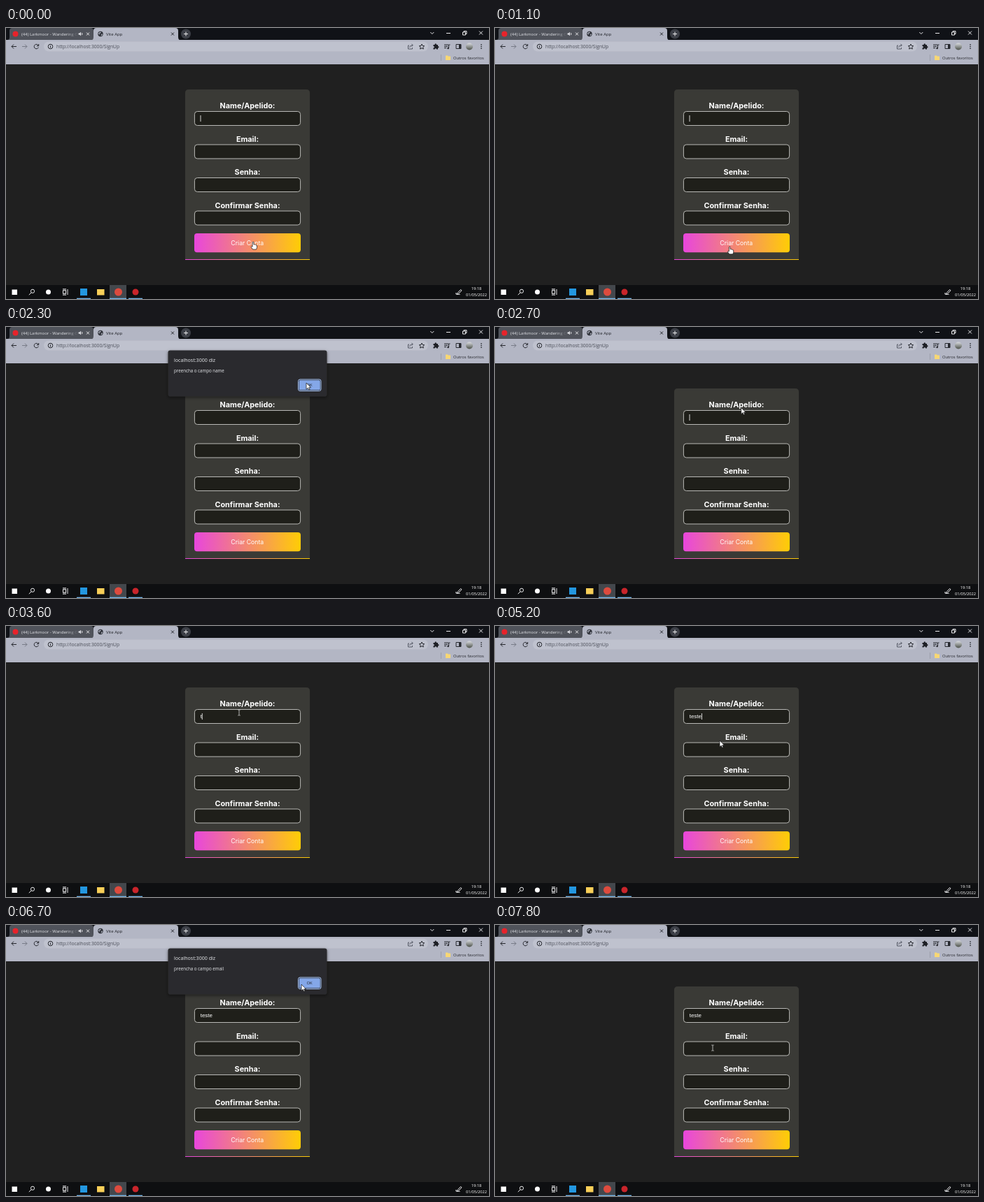
An HTML page for the animation above (8000 ms loop, 690x388 px).

```html
<!DOCTYPE html>
<html lang="pt">
<head>
<meta charset="utf-8">
<title>Vite App</title>
<style>
html, body { margin: 0; width: 100%; height: 100%; overflow: hidden; background: #202020; }
svg { display: block; width: 100vw; height: 100vh; font-family: "Open Sans", "Noto Sans", sans-serif; }
.line { fill: none; stroke: #26282e; stroke-width: 1; }
.light { stroke: #e8e8ea; }
.label { font: 700 10.8px Inter, sans-serif; fill: #fff; text-anchor: middle; }
.field { fill: #1f1f1a; stroke: #c9c9c6; stroke-width: .9; }
.value { font: 8px "Liberation Sans", Arial, sans-serif; fill: #fff; }
.cursor { fill: #fff; stroke: #111; stroke-width: .7; stroke-linejoin: round; }
</style>
</head>
<body>
<svg viewBox="0 0 690 388" preserveAspectRatio="none">
  <defs>
    <linearGradient id="warm"><stop stop-color="#e846dc"/><stop offset="1" stop-color="#ffcd05"/></linearGradient>
    <linearGradient id="fade"><stop offset=".8" stop-color="#e2e3e8"/><stop offset="1" stop-color="#e2e3e8" stop-opacity="0"/></linearGradient>
    <linearGradient id="photo" x2="0" y2="1"><stop stop-color="#d9dce0"/><stop offset="1" stop-color="#4c5149"/></linearGradient>
    <filter id="shadow" x="-10%" y="-20%" width="120%" height="150%"><feDropShadow dx="0" dy="1.5" stdDeviation="2" flood-opacity=".5"/></filter>
  </defs>

  <!-- tab strip -->
  <rect width="690" height="18" fill="#101217"/>
  <path d="M2 17Q5 17 5 13V4Q5 0 9 0H121Q125 0 125 4V17Z" fill="#50535b"/>
  <path d="M121 17.5Q125 17.5 125 13V4Q125 0 129 0H242Q246 0 246 4V13Q246 17.5 250 17.5Z" fill="#b3b6c4"/>
  <circle cx="13.5" cy="8.5" r="4" fill="#e8232b"/>
  <text x="22" y="10.8" font-size="6" fill="url(#fade)">(44) Larkmoor - Wandering O</text>
  <path d="M103.5 7.5h1.5l2-1.7v5.4l-2-1.7h-1.5z" fill="#e2e3e8"/>
  <path class="line light" stroke-width=".8" d="M108.3 7q1.4 1.5 0 3M115 6.5l4 4m0-4l-4 4"/>
  <circle cx="135" cy="8.5" r="3.7" fill="#2c2f36"/>
  <path d="M132.3 7.2q2-2.2 3.2-1.2t-1 1.6-.3 2.2-1.9-1zm4 1.6q2-.8 1.3 1t-1.9 1.2z" fill="#b3b6c4"/>
  <text x="143" y="10.8" font-size="6" fill="#22242a">Vite App</text>
  <path class="line" d="M236 6.5l4 4m0-4l-4 4"/>
  <circle cx="257" cy="8.5" r="7" fill="#3c3f47"/>
  <path class="line light" d="M257 5.5v6m-3-3h6M606.3 6l2.5 2.5L611.300 6M629 7.500h6M652.500 6h4v4h-4zM654 6V4.500h4V8.500h-1.500M676 4.500l5 5m0-5l-5 5"/>

  <!-- toolbar -->
  <rect y="17" width="690" height="35" fill="#b3b6c4"/>
  <rect x="54" y="19.500" width="549" height="14" rx="7" fill="#bfc2ce"/>
  <path class="line" d="M15 26.500H8m3-3l-3 3 3 3M46.200 25a3.200 3.200 0 1 0 .2 2.700M46.700 23v2.700h-2.700"/>
  <path class="line" style="stroke:#777b87" d="M23 26.500h7m-3-3l3 3-3 3"/>
  <g class="line" stroke-width=".8">
    <circle cx="63.500" cy="26.500" r="3.300"/>
    <path d="M63.500 26v2.300M63.500 24.500v.8"/>
    <path style="stroke:#555965" d="M576 25h-1.500v5h6v-2M576.500 28q.3-3.300 4.500-3.300m-1.500-1.900l1.800 1.900-1.800 1.800"/>
    <path d="M594 23l1.100 2.400 2.600.3-1.900 1.800.5 2.600-2.300-1.300-2.300 1.300.5-2.600-1.900-1.800 2.600-.3z"/>
  </g>
  <text x="72" y="28.900" font-size="6.750" fill="#4a4d57">http://localhost:3000/SignUp</text>
  <path d="M610.500 24h2q0-1.700 1.300-1.700T615 24h2v2q1.500 0 1.500 1.300T617 28.500V30.500h-2q0-1.300-1.200-1.300t-1.300 1.300h-2v-2q1.400 0 1.400-1.200t-1.400-1.300z" fill="#1d1f25"/>
  <path class="line" d="M626 24h6m-6 2.300h5m-5 2.300h3M632.500 29v-5h2M643 23.500h7v6h-7z"/>
  <path d="M647 23.500h3v6h-3z" fill="#26282e"/>
  <circle cx="631.600" cy="29" r="1.300" fill="#26282e"/>
  <circle cx="662" cy="26.500" r="5" fill="url(#photo)"/>
  <path d="M678.300 23h1.400v1.400h-1.400zm0 2.800h1.400v1.400h-1.400zm0 2.800h1.400v1.400h-1.400z" fill="#26282e"/>
  <path d="M621.500 38v9" stroke="#92959f" stroke-width=".7"/>
  <path d="M628 39.500h3l1 1h3v5.500h-7z" fill="#f7d774"/>
  <text x="639" y="44.600" font-size="5.800" fill="#26282e">Outros favoritos</text>

  <!-- sign-up card -->
  <path d="M256 332V93Q256 88 261 88H429Q434 88 434 93V332Z" fill="#3a3a36"/>
  <rect x="256" y="331" width="178" height="1" fill="url(#warm)"/>
  <g id="form"></g>
  <rect x="269" y="294" width="152" height="27.300" rx="4" fill="url(#warm)"/>
  <text x="344.800" y="311" text-anchor="middle" style="font:8.700px Inter,sans-serif" fill="#fff">Criar Conta</text>
  <text id="name" class="value" x="277.700" y="132.300"></text>
  <rect id="caret" width=".8" height="9" fill="#fff"/>

  <!-- taskbar -->
  <rect y="368" width="690" height="20" fill="#0e0f11"/>
  <rect x="148" y="368" width="24" height="20" fill="#43474c"/>
  <path d="M101 387.300h20M148 387.300h24M175 387.300h20" stroke="#76b9ed" stroke-width="1.300"/>
  <rect x="8.500" y="374.500" width="7.500" height="7.500" fill="#fff"/>
  <path class="line light" d="M36 379l-3.200 3.200M81.500 375.500h4v5h-4zM88 374v8M81 373.800h5M81 382.200h5"/>
  <circle class="line light" cx="38" cy="376.800" r="2.600"/>
  <circle cx="60.500" cy="378" r="3.500" fill="#fff"/>
  <rect x="106" y="373" width="10" height="10" fill="#2397e0"/>
  <rect x="130" y="374" width="10.500" height="8.500" fill="#f8cf58"/>
  <circle cx="160.500" cy="378" r="5.500" fill="#dd4b3e"/>
  <circle cx="185" cy="378" r="4.500" fill="#c9252b"/>
  <path class="line light" d="M645 379.500l4.500-5 1.500 1.300-4.500 4.700-2 .5zM643 379q-1 3 1.500 2.500t4 0"/>
  <g fill="#fff" text-anchor="middle" font-size="5.700">
    <text x="672" y="375.300">19:18</text>
    <text x="672" y="384.300">01/05/2022</text>
  </g>

  <!-- alert -->
  <g id="alert">
    <rect x="231.500" y="33.500" width="227" height="66" rx="3" fill="#292a2d" filter="url(#shadow)"/>
    <text x="240" y="50.300" font-size="7.100" fill="#e8eaed">localhost:3000 diz</text>
    <text id="message" x="240" y="64.500" font-size="6.200" fill="#e8eaed"></text>
    <rect x="417.500" y="75" width="32.500" height="16.500" rx="2.500" fill="#292a2d" stroke="#a9c6f7"/>
    <rect id="ok" x="418.700" y="76.200" width="30.100" height="14.100" rx="1.500"/>
    <text x="433.500" y="85.300" font-size="5.800" text-anchor="middle" fill="#202124">OK</text>
  </g>

  <g id="pointer">
    <path id="arrow" class="cursor" d="M0 0V9.200L2.200 7.200 3.600 10.300 5.100 9.600 3.700 6.700H6.500Z"/>
    <path id="hand" class="cursor" d="M-.9 .6Q0-.5 .9 .6V4Q2 3.300 2.700 4.300 3.800 3.800 4.300 4.800 5.600 4.700 5.500 6V8.500L4.500 11H-.5L-3 7.300Q-2.600 5.900-.9 7.100Z"/>
    <path id="beam" fill="none" stroke="#d8d8d8" stroke-width=".8" d="M-1.700-4H-.4L0-3.600 .4-4H1.700M0-3.600V3.600M-1.700 4H-.4L0 3.600 .4 4H1.700"/>
  </g>
</svg>
<script>
const LOOP = 8000, STEP = 100;
const $ = id => document.getElementById(id);
const show = (id, on) => $(id).style.display = on ? "" : "none";
const within = (t, spans) => spans.some(([a, b]) => t >= a && t < b);
const inBox = (x, y, l, t, r, b) => x >= l && x <= r && y >= t && y <= b;

const fieldTops = [119.5, 167, 214.5, 262];
$("form").innerHTML = ["Name/Apelido:", "Email:", "Senha:", "Confirmar Senha:"].map((label, i) => `
  <text class="label" x="345" y="${fieldTops[i] - 4.2}">${label}</text>
  <rect class="field" x="269.400" y="${fieldTops[i]}" width="151.200" height="20" rx="4"/>`).join("");

// time, x, y of the pointer's hot spot
const path = [
  [0, 353, 306], [600, 353, 306], [1400, 327, 316], [1600, 327, 316],
  [2200, 430, 80], [2300, 429, 80], [2400, 431, 80], [2800, 337, 122],
  [3000, 337, 122], [3400, 333, 124], [4500, 333, 124], [4800, 331, 126],
  [4900, 331, 126], [5200, 321, 164], [5700, 337, 308], [5900, 337, 308],
  [6500, 418, 90], [6700, 422, 85], [6900, 430, 82], [7000, 430, 82],
  [7400, 312, 175], [7600, 312, 175], [7800, 311, 176], [LOOP, 311, 176]
];
const alerts = [[1600, 2400, "name"], [5900, 7000, "email"]];
const keys = [3600, 3700, 3900, 4000, 4100];
const nameCaret = [[0, 300], [800, 1300], [2500, 3000], [3400, 4600], [5100, 5600]];
const emailCaret = [[7400, 7800]];

function pointerAt(t) {
  const i = path.findIndex(p => p[0] > t);
  const [t0, x0, y0] = path[i - 1], [t1, x1, y1] = path[i];
  const u = (t - t0) / (t1 - t0), e = u * u * (3 - 2 * u);
  return [x0 + (x1 - x0) * e, y0 + (y1 - y0) * e];
}

function draw(t) {
  const alert = alerts.find(([a, b]) => t >= a && t < b);
  const [x, y] = pointerAt(t);
  show("alert", alert);
  if (alert) {
    $("message").textContent = "preencha o campo " + alert[2];
    $("ok").setAttribute("fill", inBox(x, y, 418, 75, 450, 91) ? "#84a7e8" : "#8ab4f8");
  }

  const name = $("name");
  name.textContent = "teste".slice(0, keys.filter(k => t >= k).length);
  const inEmail = within(t, emailCaret);
  show("caret", inEmail || within(t, nameCaret));
  $("caret").setAttribute("x", 277.600 + (inEmail ? 0 : name.getComputedTextLength()));
  $("caret").setAttribute("y", inEmail ? 172.500 : 125);

  const onButton = inBox(x, y, 269, 294, 421, 321);
  const onField = !alert && fieldTops.some(top => inBox(x, y, 269, top, 421, top + 20));
  show("hand", onButton);
  show("beam", onField);
  show("arrow", !onButton && !onField);
  $("pointer").setAttribute("transform", `translate(${x} ${y})`);
}

const start = performance.now();
function tick() {
  const t = (performance.now() - start) % LOOP;
  draw(Math.floor(t / STEP) * STEP);
  requestAnimationFrame(tick);
}
tick();
</script>
</body>
</html>
```
